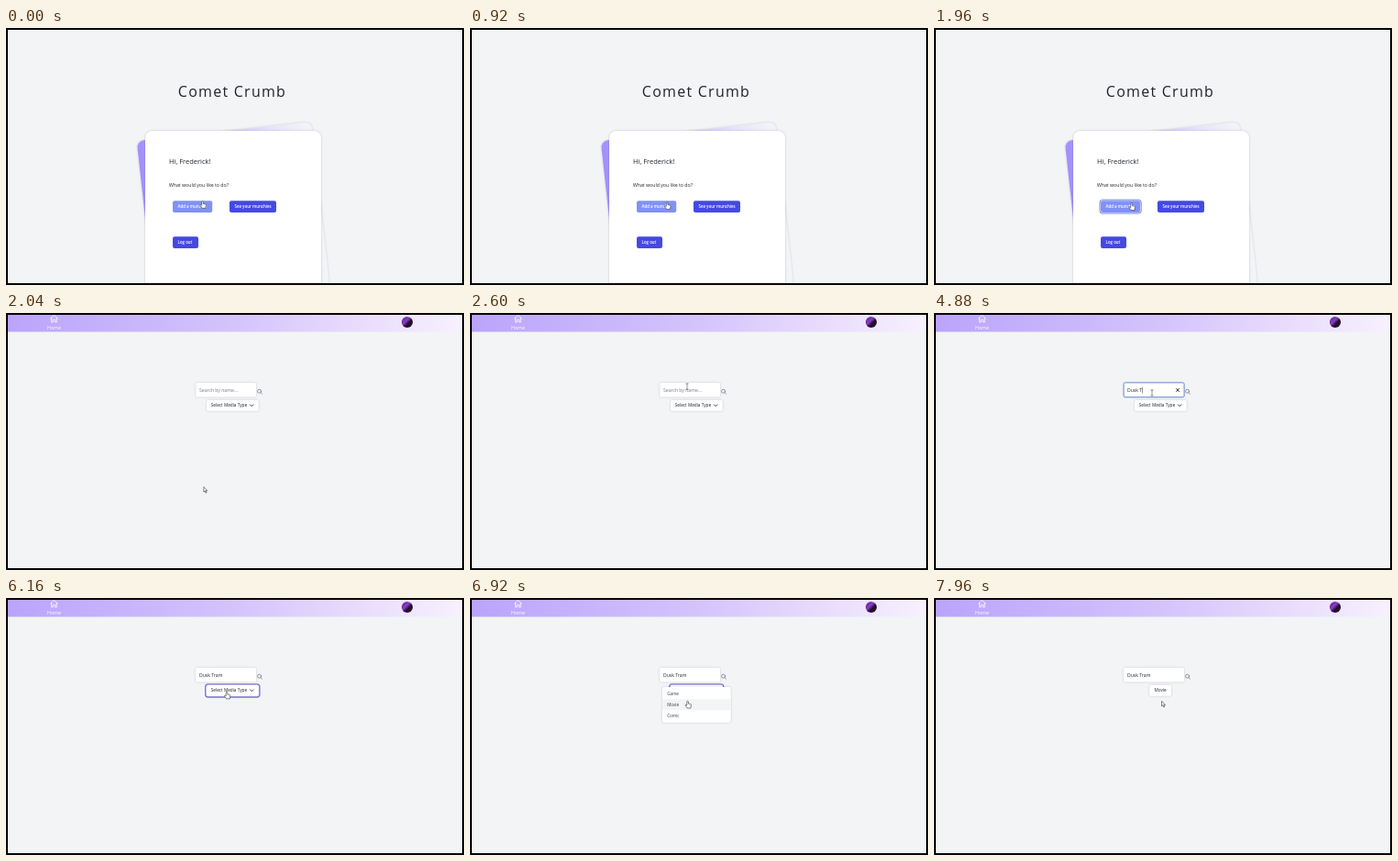
Write an HTML page that moves like this. It is 500 px wide and 280 px high and loops after 8000 ms.

```html
<!DOCTYPE html>
<html lang="en">
<head>
<meta charset="utf-8">
<title>Media tracker demo</title>
<style>
  html, body { margin: 0; width: 100%; height: 100%; overflow: hidden; background: #000; }
  svg { display: block; width: 500px; height: 280px; font-family: "Open Sans", "Noto Sans", sans-serif; fill: #1f2329; }
  text { white-space: pre; }
  .btn rect { fill: #4549e3; }
  .btn text { fill: #fff; font-size: 4.4px; font-weight: 600; }
  .soft { filter: drop-shadow(0 .6px .8px rgba(30, 35, 60, .22)); }
  .label { font-size: 4.7px; font-weight: 500; }
  .line { fill: none; stroke-linecap: round; stroke-linejoin: round; }
</style>
</head>
<body>
<svg viewBox="0 0 500 280">
  <defs>
    <linearGradient id="tilt">
      <stop offset="0" stop-color="#a28ffb"/>
      <stop offset=".35" stop-color="#c6bafa"/>
      <stop offset=".8" stop-color="#e9e6fa"/>
      <stop offset="1" stop-color="#f4f5f8"/>
    </linearGradient>
    <linearGradient id="bar">
      <stop offset="0" stop-color="#b9a4fb"/>
      <stop offset=".5" stop-color="#d5c3fc"/>
      <stop offset="1" stop-color="#f8f1fd"/>
    </linearGradient>
    <linearGradient id="face" x2="1" y2="1">
      <stop offset=".1" stop-color="#5b2388"/>
      <stop offset=".4" stop-color="#8e3cc8"/>
      <stop offset=".6" stop-color="#1d1028"/>
      <stop offset="1" stop-color="#2c1440"/>
    </linearGradient>
  </defs>
  <rect width="500" height="280" fill="#f3f4f6"/>

  <g id="welcome">
    <text x="247" y="75" font-size="16" letter-spacing="1.25" text-anchor="middle">Comet Crumb</text>
    <rect class="soft" x="152" y="112" width="192" height="180" rx="8" fill="url(#tilt)" transform="rotate(-6.3 248 202)"/>
    <rect class="soft" x="152" y="112" width="192" height="180" rx="8" fill="#fff"/>
    <text x="178" y="148" font-size="7.5">Hi, Frederick!</text>
    <text x="178" y="172.7" font-size="5.2">What would you like to do?</text>
    <rect id="addRing" x="181" y="187.2" width="45.2" height="14.8" rx="2.8" fill="#fff" stroke="#7480d8" stroke-width="1"/>
    <g class="btn">
      <rect x="182" y="188.2" width="43.2" height="12.8" rx="2" style="fill:#8091f7"/>
      <text x="187.5" y="196.3">Add a munchie</text>
      <rect x="244" y="188.2" width="51" height="12.8" rx="2"/>
      <text x="249.5" y="196.3">See your munchies</text>
      <rect x="182" y="227.2" width="28" height="12.8" rx="2"/>
      <text x="187.5" y="235.3">Log out</text>
    </g>
  </g>

  <g id="search">
    <rect width="500" height="20.5" fill="url(#bar)"/>
    <path class="line" d="M48.6 6.2 52.5 2.3 56.4 6.2M49.7 5.3V10H51.4V7.2H53.6V10H55.3V5.3" stroke="#fff" stroke-width=".8"/>
    <text x="45" y="18" font-size="5.3" style="fill:#fff">Home</text>
    <circle cx="438" cy="10" r="6.1" fill="url(#face)"/>

    <rect class="soft" x="207.3" y="76" width="65.7" height="15.6" rx="1.6" fill="#fff"/>
    <rect id="focus" x="207.1" y="75.9" width="66" height="15.8" rx="1.6" fill="none" stroke="#5a88c8" stroke-width=".9"/>
    <text id="query" x="211" y="86" font-size="5.1"></text>
    <path id="caret" d="M.4 81V87.4" stroke="#222" stroke-width=".5"/>
    <path id="clear" class="line" d="M264.6 82.4 267.6 85.6M267.6 82.4 264.6 85.6" stroke="#222" stroke-width=".9"/>
    <g class="line" stroke="#6b7280" stroke-width=".7"><circle cx="276.6" cy="85.2" r="2"/><path d="M278.1 86.7 279.7 88.3"/></g>

    <rect id="typeRing" x="217.7" y="93.8" width="59.2" height="14.2" rx="3" fill="#fff" stroke="#7b74dc" stroke-width="1.3"/>
    <g id="select">
      <rect class="soft" x="219" y="95" width="56.8" height="11.8" rx="1.8" fill="#fff"/>
      <text class="label" x="223.8" y="102.4">Select Media Type</text>
      <path class="line" d="M266.5 99.9 268.2 101.6 269.9 99.9" stroke="#222" stroke-width=".9"/>
    </g>
    <g id="chosen">
      <rect class="soft" x="235.2" y="94.8" width="23.8" height="12" rx="1.8" fill="#fff"/>
      <text class="label" x="247.1" y="102.4" text-anchor="middle">Movie</text>
    </g>
    <g id="menu" class="soft">
      <rect x="210" y="97" width="74.8" height="38.8" rx="2" fill="#fff"/>
      <rect id="hover" x="210" y="110.2" width="74.8" height="12" fill="#f3f4f6"/>
      <g font-size="4.6" fill="#374151">
        <text x="215.2" y="105.8">Game</text><text x="215.2" y="117.8">Movie</text><text x="215.2" y="129.8">Comic</text>
      </g>
    </g>
  </g>

  <g id="cursor" stroke="#333" stroke-width=".6" stroke-linejoin="round" fill="#fff">
    <path id="arrow" d="M0 0V5.6L1.3 4.4 2.3 6.6 3.2 6.2 2.2 4.1H3.9Z"/>
    <path id="hand" d="M-.8 4.9V.5Q0-.5.8.5V2.9L3 3.3Q3.9 3.5 3.8 4.6L3.3 7.8H-.4L-2.6 4.9Q-2.6 3.8-1.6 4.2Z"/>
    <path id="beam" class="line" d="M-1.2-3H1.2M0-3V3M-1.2 3H1.2" stroke="#555"/>
  </g>
  <rect x="1" y="1" width="498" height="278" fill="none" stroke="#000" stroke-width="2"/>
</svg>
<script>
const LOOP = 8000, TITLE = 'Dusk Tram';
const KEYS = [4000, 4160, 4320, 4480, 4680, 4880, 5080, 5200, 5320];
const PAGE = 2040, FOCUS = 3480, BLUR = 6040, OPEN = 6240, PICK = 7580;

// time, x, y of the pointer's hot spot
const PATH = [
  [0, 214.5, 188.5], [40, 214.5, 188.5], [440, 215, 189.5], [840, 215, 189.5], [1160, 215.6, 190.5],
  [1800, 215.6, 190.5], [1960, 215.6, 190.8], [2080, 216, 189], [2600, 237, 80],
  [2640, 237, 80], [3240, 238, 87], [5680, 238, 87], [6000, 241, 102], [6480, 241, 102],
  [6720, 237.6, 112.2], [7100, 237.6, 112.2], [7360, 240, 114], [7600, 240, 114], [7920, 248.6, 112.3], [8000, 248.6, 112.3]
];

const el = id => document.getElementById(id);
const ramp = (t, from, len) => Math.min(1, Math.max(0, (t - from) / len));
const within = (t, from, to) => t >= from && t < to;
const alpha = (id, a) => el(id).setAttribute('opacity', a);
const show = (id, on) => { el(id).style.display = on ? '' : 'none'; };

function pointer(t) {
  const i = PATH.findIndex(p => p[0] > t);
  const [t0, x0, y0] = PATH[i - 1], [t1, x1, y1] = PATH[i];
  const u = (t - t0) / (t1 - t0), e = u * u * (3 - 2 * u);
  return [x0 + (x1 - x0) * e, y0 + (y1 - y0) * e];
}

function drawForm(t) {
  const typed = KEYS.filter(k => k <= t).length;
  const focused = within(t, FOCUS, BLUR);
  const query = el('query');
  query.textContent = typed ? TITLE.slice(0, typed) : 'Search by name...';
  query.style.fill = typed ? '#1f2329' : '#757b86';
  alpha('focus', focused ? ramp(t, FOCUS - 40, 80) : 0);
  show('clear', focused && typed);
  show('caret', focused);
  const end = 211 + (typed ? query.getComputedTextLength() : 0);
  el('caret').setAttribute('transform', `translate(${end})`);

  const menu = ramp(t, OPEN, 120) * (1 - ramp(t, PICK, 100));
  const size = .95 + .05 * menu;
  alpha('menu', menu);
  el('menu').setAttribute('transform', `translate(247.4 97) scale(${size}) translate(-247.4 -97)`);
  show('typeRing', within(t, BLUR, PICK));
  show('select', t < PICK);
  show('chosen', t >= PICK);
}

function draw(t) {
  const first = t < PAGE, [x, y] = pointer(t);
  show('welcome', first);
  show('search', !first);
  alpha('addRing', ramp(t, 1340, 160));
  if (!first) drawForm(t);

  const overMenu = within(t, OPEN, PICK + 60);
  show('hover', overMenu && y > 110);
  const overInput = !first && within(y, 76, 92) && within(x, 207, 273);
  const overButton = !first && t < OPEN && within(y, 95, 107) && within(x, 219, 276);
  const hand = first || overMenu || overButton;
  show('hand', hand);
  show('beam', overInput);
  show('arrow', !hand && !overInput);
  el('cursor').setAttribute('transform', `translate(${x} ${y})`);
}

function frame() {
  draw(performance.now() % LOOP);
  requestAnimationFrame(frame);
}
frame();
</script>
</body>
</html>
```
